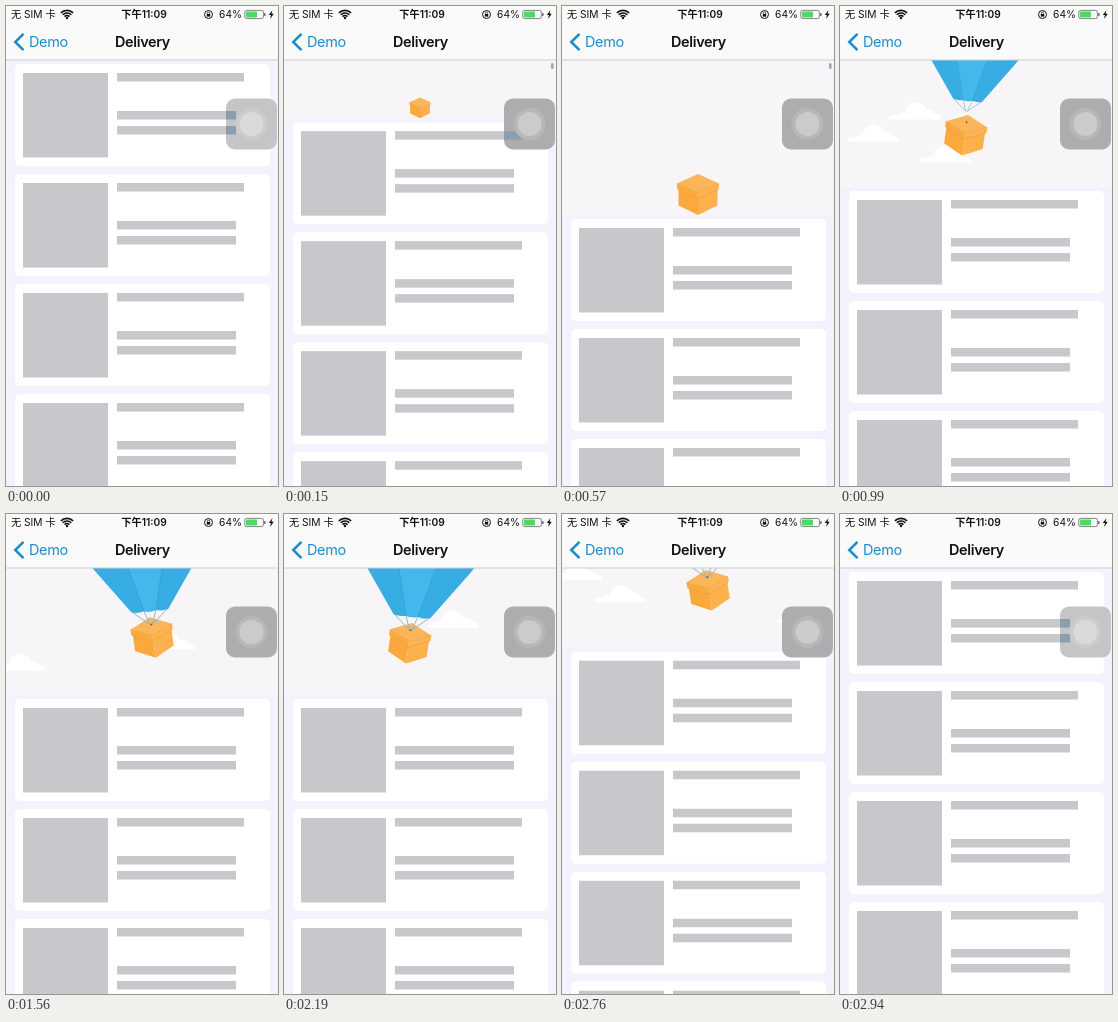
An HTML page with a canvas for the animation above (2.97 s loop, 272 px wide and 480 px high).

```html
<!DOCTYPE html>
<html lang="en">
<head>
<meta charset="utf-8">
<title>Delivery pull to refresh</title>
<style>
html, body { margin: 0; width: 100%; height: 100%; overflow: hidden; background: #f4f2fc; }
canvas { display: block; width: 272px; height: 480px; }
</style>
</head>
<body>
<canvas id="stage" width="272" height="480"></canvas>
<script>
const c = document.getElementById('stage').getContext('2d');
const LOOP = 2970, STEP = 30, NAV = 54;
const REST = 127, PULL = 155;
const REFRESH = 730;
const FONT = 'Inter, "Noto Sans CJK SC", "Noto Sans CJK", sans-serif';

const clamp = x => Math.max(0, Math.min(1, x));
const smooth = x => { x = clamp(x); return x * x * (3 - 2 * x); };
const mix = (a, b, k) => a + (b - a) * k;

function rect(x, y, w, h, color) {
  c.fillStyle = color;
  c.fillRect(x, y, w, h);
}
function round(x, y, w, h, r, color) {
  c.fillStyle = color;
  c.beginPath();
  c.roundRect(x, y, w, h, r);
  c.fill();
}
function disc(x, y, r, color) {
  c.fillStyle = color;
  c.beginPath();
  c.arc(x, y, r, 0, 7);
  c.fill();
}
function shape(d, color) {
  c.fillStyle = color;
  c.fill(new Path2D(d));
}
function line(d, color, width = 1) {
  c.strokeStyle = color;
  c.lineWidth = width;
  c.stroke(new Path2D(d));
}
function text(s, x, y, size, color, weight = 400, align = 'left', spacing = 0) {
  c.font = `${weight} ${size}px ${FONT}`;
  c.letterSpacing = spacing + 'px';
  c.textAlign = align;
  c.fillStyle = color;
  c.fillText(s, x, y);
}
// Runs a drawing routine in a moved, turned and scaled space.
function at(x, y, angle, scale, draw) {
  c.save();
  c.translate(x, y);
  c.rotate(angle * Math.PI / 180);
  c.scale(scale, scale);
  draw();
  c.restore();
}

// Distance the list is pulled down.
function pulled(t) {
  if (t < 520) return PULL * Math.sin(Math.PI / 2 * clamp((t - 30) / 490));
  if (t < 2600) return mix(PULL, REST, 1 - (1 - clamp((t - 720) / 250)) ** 2);
  return REST * (1 - smooth((t - 2640) / 290));
}

function bars(off, color) {
  for (let y = 58 + off; y < 480; y += 110) {
    rect(111, y + 9, 127, 8.5, color);
    rect(111, y + 47, 119, 8.5, color);
    rect(111, y + 62, 119, 8.5, color);
  }
}
function list(off) {
  for (let y = 58 + off; y < 480; y += 110) {
    round(9, y, 255, 102, 5, '#fff');
    rect(17, y + 9, 85, 84.5, '#c8c7cb');
  }
  bars(off, '#c8c7cb');
}

function cloud(x, y) {
  at(x, y, 0, 1, () => shape('M0 17.5Q2 12 9 13Q12 10 16 11Q17 1 27 .5Q35 1 38 8Q43 6 46 12Q52 12 53 17.5Z', '#fff'));
}

function parcel() {
  shape('M-19.5-8V11L0 20.5V2Z', '#fba93c');
  shape('M19.5-8V11L0 20.5V2Z', '#fdb14c');
  shape('M0-20.5L21-11L0-2L-21-11Z', '#fcb65a');
  shape('M-21-11L0-2V4L-21-5.5Z', '#fbaa3f');
  shape('M21-11L0-2V4L21-5.5Z', '#fdb352');
  line('M-20-5L0 4L20-5M-21-11L0-2L21-11', '#eb9c38', .6);
}

// Origin at the knot where the strings meet.
function chute() {
  line('M-17.5-14L-1 0L-6-14M17.5-14L1 0L6-14', '#8bb4c8', .9);
  shape('M-18.5-14L-52-61L-75-95H75L52-61L18.5-14Q12-12 6-14Q0-12-6-14Q-12-12-18.5-14Z', '#37ade4');
  shape('M-6-14L-18-61L-26-95H26L18-61L6-14Q0-12-6-14Z', '#45b7ea');
  line('M-6-14L-18-61M6-14L18-61', '#2f9fd6', .7);
}

function header(t, off) {
  c.save();
  c.beginPath();
  c.rect(0, NAV, 272, off);
  c.clip();
  rect(0, NAV, 272, off, '#f7f5f8');
  c.translate(0, off - REST);
  const age = t - REFRESH;
  if (age < 0) {
    const s = clamp(off / 115);
    at(136, 181 - 20.5 * s, 0, s, parcel);
  } else {
    [[.3925, 96], [.228, 118], [.504, 139]].forEach(([v, y]) => cloud(age * v % 378 - 53, y));
    const swing = 2 * Math.PI * (t - 690) / 1200;
    const sway = Math.sin(swing), lift = smooth(age / 240);
    const x = 136 - 11 * sway * lift;
    const y = mix(160.5, 127 + 2.2 * sway + 8 * Math.cos(swing), lift);
    const open = clamp(age / 333);
    at(x, y, 8.5 * sway * lift, 1, parcel);
    at(x + 1.5 * sway, y - 13 - 50 * (1 - open), 6 * sway, open, chute);
    if (open > .3) disc(x + 1.5 * sway, y - 13, 1, '#6b6257');
  }
  c.restore();
}

function touchButton(off) {
  const k = clamp(off / 50);
  const gray = (a, b) => { const v = Math.round(mix(a, b, k)); return `rgb(${v},${v - 1},${v + 1})`; };
  round(220, 92.5, 51, 51, 9, gray(197, 173));
  c.save();
  c.beginPath();
  c.rect(220, 93, 51, 50);
  c.clip();
  bars(off, '#8a9fae');
  c.restore();
  disc(245.5, 118, 16, gray(204, 183));
  disc(245.5, 118, 12, gray(218, 203));
}

function statusBar() {
  const ink = '#111';
  text('无 SIM 卡', 5, 12.3, 10.2, ink);
  for (const r of [3.4, 6, 8.6]) {
    c.beginPath();
    c.arc(61, 13, r, -2.36, -.78);
    c.strokeStyle = ink;
    c.lineWidth = 1.7;
    c.stroke();
  }
  disc(61, 12, 1.2, ink);
  text('下午11:09', 138, 12.3, 10.2, ink, 600, 'center');
  c.beginPath();
  c.arc(202.5, 8.5, 4, 0, 7);
  c.strokeStyle = ink;
  c.lineWidth = 1;
  c.stroke();
  rect(200.8, 8, 3.4, 2.6, ink);
  line('M201.4 8V7.2A1.1 1.1 0 0 1 203.6 7.2V8', ink, .7);
  text('64%', 236, 12.3, 10.2, ink, 400, 'right');
  c.beginPath();
  c.roundRect(238.8, 4.4, 18.6, 8.2, 1.8);
  c.lineWidth = .7;
  c.strokeStyle = '#555';
  c.stroke();
  round(240, 5.5, 11, 6, .8, '#4cd964');
  round(258.2, 7, 1.3, 3, .6, '#555');
  shape('M266.5 4L262.8 9H265L264 13L267.8 7.7H265.5Z', ink);
}
function navBar() {
  rect(0, 0, 272, NAV, '#fafafb');
  rect(0, NAV - .5, 272, 1, '#cfcdd2');
  statusBar();
  line('M17.5 27.8L9.2 36L17.5 44.2', '#1d8ccb', 2.5);
  text('Demo', 23, 41, 14.45, '#1d8ccb', 400, 'left', -.35);
  text('Delivery', 136.5, 41, 14.45, '#111', 600, 'center', -.35);
}

function draw() {
  const t = Math.floor(performance.now() % LOOP / STEP) * STEP;
  const off = pulled(t);
  rect(0, 0, 272, 480, '#f4f2fc');
  header(t, off);
  list(off);
  if (t > 60 && t < 900) round(267, 57, 2.6, 6, 1.3, '#a0a5b3');
  navBar();
  touchButton(off);
  requestAnimationFrame(draw);
}
draw();
</script>
</body>
</html>
```
